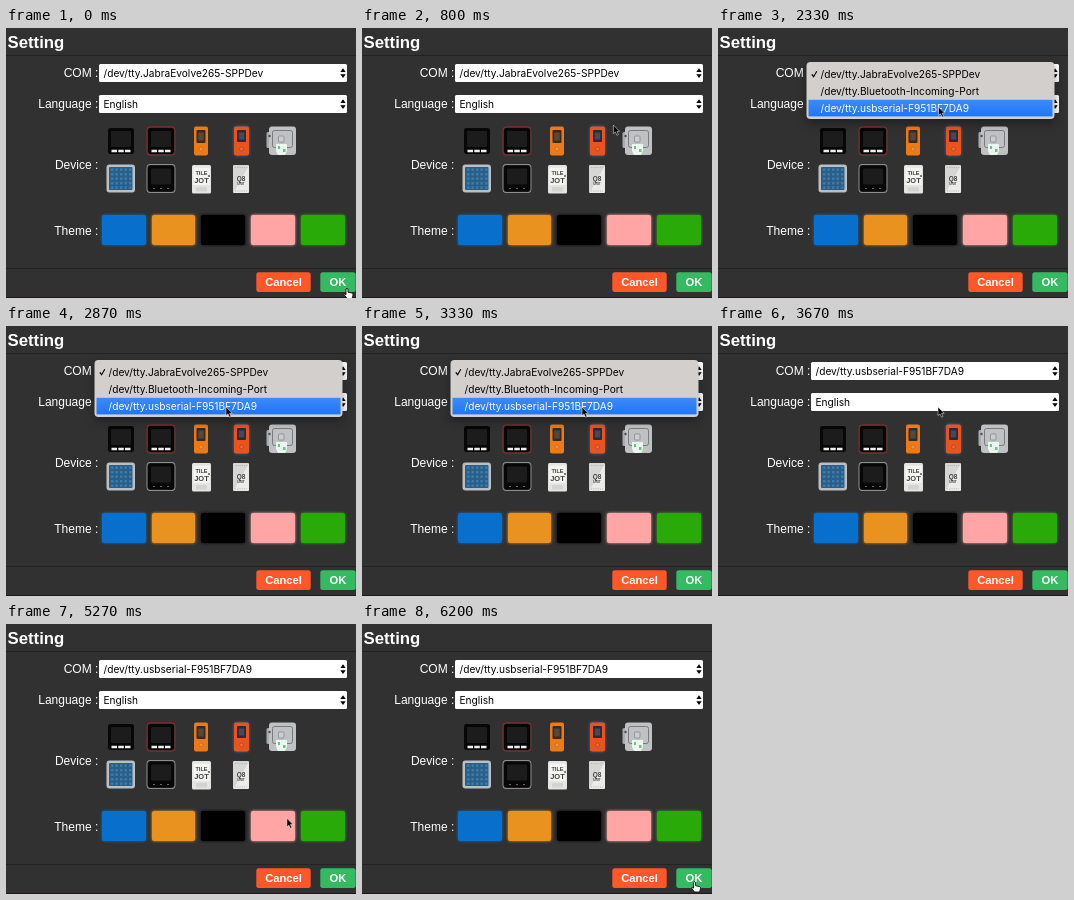
An HTML page that plays this animation: 350x270 px, repeating every 6.27 s.

```html
<!DOCTYPE html>
<html lang="en">
<head>
<meta charset="utf-8">
<title>Setting</title>
<style>
  html, body { margin: 0; width: 100%; height: 100%; overflow: hidden; background: #313131; }
  svg { display: block; width: 350px; height: 270px; }
  text { font-family: "Liberation Sans", Arial, sans-serif; fill: #fff; }
  .label { font-size: 12px; text-anchor: end; }
  .btn { font-size: 11.2px; font-weight: bold; text-anchor: middle; }
  .opt { font: 10.16px Inter, Roboto, sans-serif; fill: #000; }
  .opt.on { fill: #fff; }
  #menu { filter: drop-shadow(0 4px 5px rgba(0, 0, 0, .35)); }
  #themes rect { fill: currentColor; filter: drop-shadow(0 0 1.5px currentColor); }
  #picked { filter: drop-shadow(0 0 1.5px #3b6fb0); }
  .tiny { font-weight: bold; fill: #444; text-anchor: middle; }
</style>
</head>
<body>
<svg viewBox="0 0 350 270">
  <defs>
    <linearGradient id="blue" x2="0" y2="1">
      <stop stop-color="#3d8bfa"/><stop offset="1" stop-color="#1f75f6"/>
    </linearGradient>
    <linearGradient id="paper" y2="1">
      <stop offset=".5" stop-color="#d6d6d5"/><stop offset=".52" stop-color="#ebebea"/>
    </linearGradient>
    <pattern id="keys" x="104" y="139.5" width="4.5" height="4.5" patternUnits="userSpaceOnUse">
      <rect width="4.5" height="4.5" fill="#2b5d86"/>
      <rect x="1" y="1" width="2.4" height="2.4" rx=".8" fill="#3b82b4"/>
    </pattern>
    <path id="arrows" d="M334.3 44L337 40.2 339.7 44zM334.3 46.2L337 50 339.7 46.2z"/>
    <g id="core">
      <rect x=".5" y=".5" width="27" height="27" rx="3" fill="#070707" stroke="#484848" stroke-width=".5"/>
      <rect x="4" y="4" width="20" height="16" rx="1" fill="#1c1c1d"/>
    </g>
    <path id="buttons" d="M4.5 22.7h5.5v2.6H4.5zM11.3 22.7h5.5v2.6h-5.5zM18 22.7h5.5v2.6H18z" fill="#eee"/>
  </defs>

  <rect width="350" height="270" fill="#313131"/>
  <path d="M0 27.5H350M0 240.5H350" stroke="#222"/>
  <path d="M0 269.5H350" stroke="#1f171b"/>
  <text x="1.5" y="20" font-size="16.8" font-weight="bold">Setting</text>
  <text class="label" x="92.3" y="49">COM :</text>
  <text class="label" x="92.3" y="80">Language :</text>
  <text class="label" x="92.3" y="141">Device :</text>
  <text class="label" x="92.3" y="207">Theme :</text>

  <rect x="93" y="36" width="248" height="18" rx="1.5" fill="#fff"/>
  <rect x="93" y="67" width="248" height="18" rx="1.5" fill="#fff"/>
  <use href="#arrows"/><use href="#arrows" y="31"/>
  <text class="opt" id="value" x="97.5" y="49"></text>
  <text class="opt" x="97.5" y="80">English</text>

  <!-- devices, first row -->
  <use href="#core" x="101" y="99"/><use href="#buttons" x="101" y="99"/>
  <rect x="141.5" y="99.5" width="27" height="27" rx="3" fill="none" stroke="#a52b2b" stroke-width="1.8"/>
  <use href="#core" x="141" y="99"/><use href="#buttons" x="141" y="99"/>
  <rect x="188" y="98.5" width="14" height="29" rx="2" fill="#ee7a17"/>
  <rect x="190.5" y="102" width="9" height="13" rx="1" fill="#3a2a1c"/>
  <rect x="192.3" y="104.5" width="5.4" height="8" fill="#55493f"/>
  <circle cx="195" cy="121" r="2" fill="#f3923c" stroke="#c9661a" stroke-width=".7"/>
  <g id="picked">
    <rect x="228" y="98.5" width="15" height="29" rx="2" fill="#e9531d"/>
    <rect x="231" y="102" width="9" height="12" rx="1" fill="#2c2a34"/>
    <rect x="232.8" y="104.5" width="5.4" height="7" fill="#47485a"/>
    <circle cx="235.5" cy="121" r="2" fill="#ee6a32" stroke="#b9431a" stroke-width=".7"/>
  </g>
  <rect x="260.5" y="104" width="5" height="16" rx="1.5" fill="#a9acae"/>
  <rect x="263" y="98.5" width="27" height="28.5" rx="3" fill="#bfc1c2"/>
  <rect x="266.5" y="102.5" width="20" height="17" rx="2" fill="none" stroke="#707375" stroke-width=".9"/>
  <circle cx="263.5" cy="108" r="1.2" fill="#4d5154"/>
  <rect x="272.5" y="108" width="5.5" height="6" rx="1" fill="#caced0" stroke="#73787b" stroke-width=".6"/>
  <path d="M270 116h11v7l-2 4h-7l-2-4z" fill="#eef4ef"/>
  <path d="M272 118h2v3h-2zM277 121h2.5v3H277z" fill="#58ce78"/>

  <!-- devices, second row -->
  <rect x="100.5" y="136.5" width="28.5" height="28" rx="3" fill="#b9bfc3"/>
  <rect x="103" y="139" width="23.5" height="23" rx="1" fill="url(#keys)"/>
  <rect x="141.5" y="137" width="27" height="27" rx="3" fill="none" stroke="#a5a5a5" stroke-width="1.8"/>
  <use href="#core" x="141" y="136.5"/>
  <path d="M147 160.5h2m5 0h2m5 0h2" stroke="#7d5d58"/>
  <rect x="186" y="137" width="19" height="28.5" rx="1.5" fill="#e4e4e2"/>
  <rect x="187.5" y="139.5" width="16" height="17.5" fill="#f4f4f1"/>
  <text class="tiny" x="195.5" y="147.3" font-size="5.6">TILE</text>
  <text class="tiny" x="195.5" y="155.3" font-size="7.5">JOT</text>
  <rect x="190" y="159" width="11" height="4.5" rx="1" fill="#d3d3d1"/>
  <circle cx="203" cy="148" r="1" fill="#555"/>
  <rect x="227" y="137" width="16" height="28" rx="1" fill="url(#paper)"/>
  <path d="M229 139.5h12M229 163h12" stroke="#b9b9b9" stroke-dasharray="1.2 1"/>
  <text class="tiny" x="235" y="152.5" font-size="6.5">Q8</text>
  <text class="tiny" x="235" y="157" font-size="3.2">UNIT</text>

  <g id="themes">
    <rect x="96" y="187" width="44" height="30" rx="2" color="#0870cc"/>
    <rect x="146" y="187" width="43" height="30" rx="2" color="#ea9220"/>
    <rect x="195" y="187" width="44" height="30" rx="2" color="#000"/>
    <rect x="245" y="187" width="44" height="30" rx="2" color="#ffa5a5"/>
    <rect x="295" y="187" width="44" height="30" rx="2" color="#2aaa08"/>
  </g>

  <rect x="250.3" y="244.3" width="54.4" height="19.6" rx="2.5" fill="#ff5728"/>
  <rect x="314.3" y="244.3" width="35.4" height="19.6" rx="2.5" fill="#34bb62"/>
  <text class="btn" x="277.5" y="258">Cancel</text>
  <text class="btn" x="332" y="258">OK</text>

  <g id="menu">
    <rect x="88.5" y="34" width="248" height="57" rx="4" fill="#d2cfcd"/>
    <rect id="bar" x="90.5" width="244" height="16.6" fill="url(#blue)"/>
    <path id="check" d="M93.8 46.4l1.8 2.3 3.2-5.4" fill="none" stroke-width="1.2"/>
  </g>

  <path id="arrow" d="M0 0V8.6L2 6.9 3.5 10.2 5 9.5 3.6 6.3H6.2z" fill="#000" stroke="#fff" stroke-width=".5"/>
  <path id="hand" d="M-1 1q1-1.6 2 0V4.2l4 .8q1.2.4 1 2L5.2 10.5H0L-3 6.6q-.2-1.4 2 0z" fill="#fff" stroke="#111" stroke-width=".9"/>
</svg>
<script>
const $ = id => document.getElementById(id);
const LOOP = 6270, STEP = 1000 / 15, ROW = 16.9;
const ports = ["/dev/tty.JabraEvolve265-SPPDev", "/dev/tty.Bluetooth-Incoming-Port", "/dev/tty.usbserial-F951BF7DA9"];

const options = ports.map((name, i) => {
  const el = document.createElementNS("http://www.w3.org/2000/svg", "text");
  el.textContent = name;
  el.setAttribute("x", 102.5);
  el.setAttribute("y", 50 + ROW * i);
  $("menu").append(el);
  return el;
});

const smooth = p => p * p * (3 - 2 * p);
const speedUp = p => p ** 1.5;
const slowDown = p => 1 - (1 - p) ** 2;

// Pointer path: time, x, y, easing of the way there
const path = [
  [0, 341, 260], [400, 341, 260], [1000, 220, 40, smooth],
  [1067, 220, 40], [1133, 219.5, 40],
  [2000, 219.5, 40], [2400, 220.5, 80, slowDown],
  [2667, 220.5, 80], [2867, 220, 81, smooth],
  [4133, 220, 81], [4600, 238, 120, smooth],
  [5067, 238, 120], [5267, 281, 194.5, speedUp], [5733, 338, 256, slowDown],
  [5867, 332.5, 257.5, smooth], [LOOP, 332.5, 257.5]
];

function pointer(t) {
  const i = path.findIndex(k => k[0] > t);
  const [t0, x0, y0] = path[i - 1], [t1, x1, y1, ease = smooth] = path[i];
  const p = ease((t - t0) / (t1 - t0));
  return [x0 + (x1 - x0) * p, y0 + (y1 - y0) * p];
}

function draw(ms) {
  // The screen updates 15 times a second
  const n = Math.floor((ms % LOOP + 3.4) / STEP), t = Math.min(n * STEP, LOOP - 1);
  const [x, y] = pointer(t);
  const overButton = y > 244 && (x > 314 || x > 250 && x < 305);
  $("arrow").style.display = overButton ? "none" : "";
  $("hand").style.display = overButton ? "" : "none";
  for (const id of ["arrow", "hand"]) $(id).setAttribute("transform", `translate(${x} ${y})`);

  // Opens at step 20, blinks at 48, fades out from 51 to 55
  const alpha = n < 20 || n >= 55 ? 0 : Math.min(1, (55 - n) / 5);
  const row = n === 48 ? -1 : y < 55 ? 0 : y < 71 ? 1 : 2;
  $("menu").style.opacity = alpha;
  $("bar").setAttribute("y", 38 + ROW * row);
  $("bar").style.display = row < 0 ? "none" : "";
  $("check").setAttribute("stroke", row ? "#000" : "#fff");
  options.forEach((el, i) => el.setAttribute("class", i === row ? "opt on" : "opt"));
  $("value").textContent = ports[n < 51 ? 0 : 2];
}

const start = performance.now();
function tick() {
  draw(performance.now() - start);
  requestAnimationFrame(tick);
}
tick();
</script>
</body>
</html>
```
